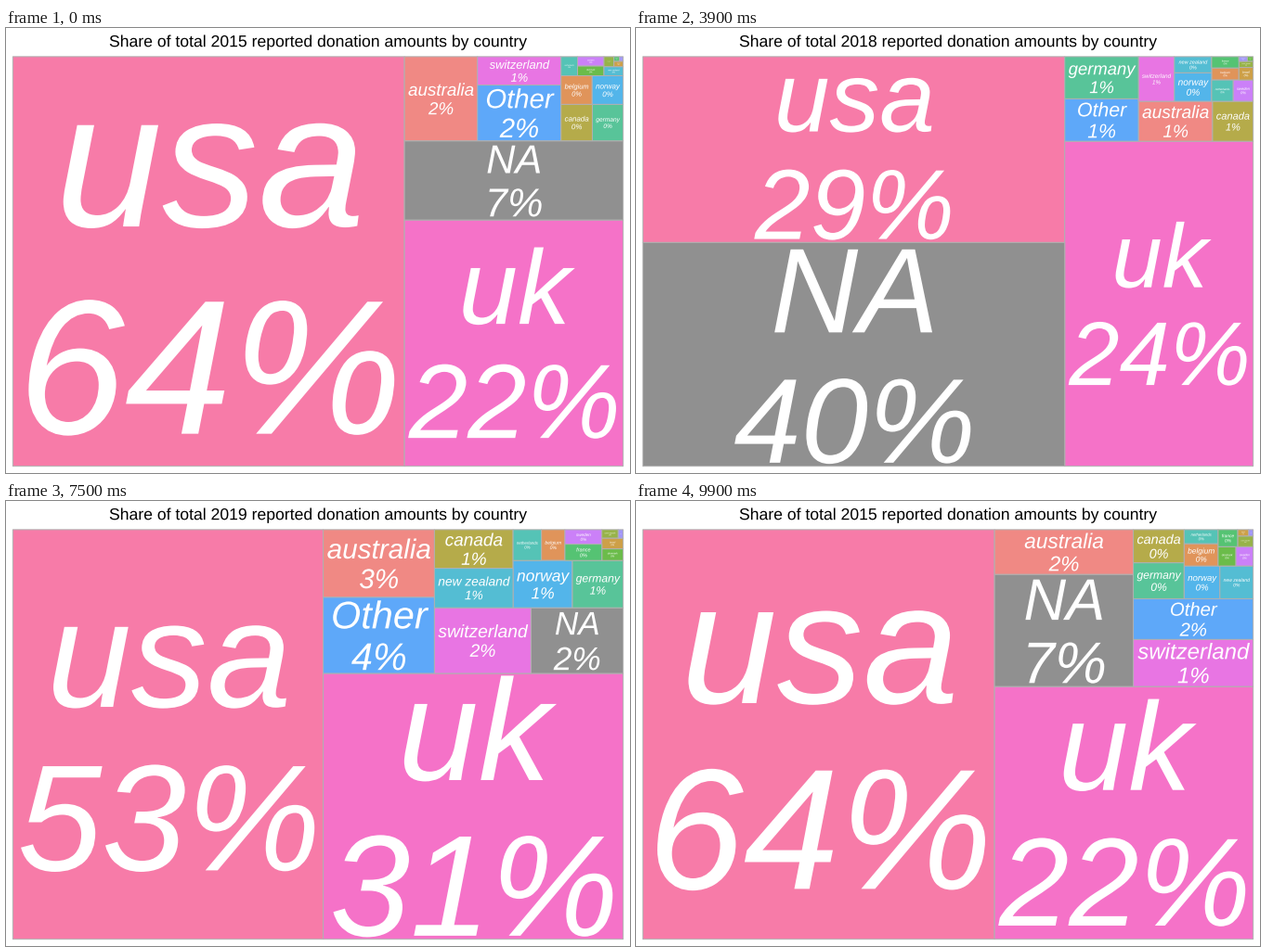
A matplotlib script for the animation above (10 s loop, 672 by 480 pixels).

```python
from functools import lru_cache

import matplotlib.pyplot as plt
from matplotlib.animation import FuncAnimation
from matplotlib.patches import PathPatch, Rectangle
from matplotlib.textpath import TextPath
from matplotlib.transforms import Affine2D

W, H, DPI = 672, 480, 96
LEFT, BOTTOM, PANEL_W, PANEL_H = 7.33, 7.33, 657.33, 441.8
PAD = 3.78            # 1 mm
LINE_GAP = 1.08       # em between baselines
CAP = 0.716           # em
SLANT = 0.008         # em, balances the side bearings of the italic
HOLD, TWEEN = 15, 5   # frames at rest, frames between two years
STEP = HOLD + TWEEN

YEARS = [2015, 2017, 2018, 2019, 2020]
TOTALS = [6.75, 9.8, 18.6, 16.1, 10.7]   # millions

# name: (colour, share in percent for each year)
COUNTRIES = {
    "usa": ("#f77ba8", (64.15, 49.96, 29.41, 52.70, 37.00)),
    "uk": ("#f572c8", (21.54, 28.25, 24.09, 30.73, 40.66)),
    "NA": ("#909090", (6.92, 12.59, 40.40, 2.21, 4.025)),
    "australia": ("#f08984", (2.46, 1.789, 1.121, 3.073, 2.558)),
    "Other": ("#5ea8f9", (1.865, 1.206, 1.257, 3.538, 2.243)),
    "switzerland": ("#e875e3", (0.95, 0.506, 0.656, 2.025, 6.36)),
    "canada": ("#b5ab4a", (0.457, 1.17, 0.594, 1.197, 1.365)),
    "germany": ("#58c499", (0.45, 1.967, 1.165, 0.877, 1.61)),
    "belgium": ("#e0945a", (0.356, 0.185, 0.126, 0.310, 0.145)),
    "norway": ("#53b5ea", (0.355, 1.579, 0.304, 1.159, 0.814)),
    "netherlands": ("#55c3b6", (0.126, 0.164, 0.186, 0.344, 0.397)),
    "denmark": ("#6bbc4a", (0.104, 0.023, 0.010, 0.080, 0.246)),
    "sweden": ("#cb80f8", (0.098, 0.158, 0.171, 0.212, 0.249)),
    "new zealand": ("#54bdd3", (0.070, 0.319, 0.232, 1.195, 1.583)),
    "czech republic": ("#97b348", (0.040, 0.042, 0.034, 0.044, 0.150)),
    "brazil": ("#cda048", (0.020, 0.070, 0.072, 0.095, 0.054)),
    "france": ("#55c373", (0.010, 0.040, 0.132, 0.203, 0.520)),
    "singapore": ("#a296f8", (0.007, 0.007, 0.017, 0.016, 0.026)),
}

# advance widths in em; every other glyph is 0.556
ADVANCE = {}
for chars, width in (("ijl", 0.222), ("tf ", 0.278), ("r", 0.333),
                     ("ckvxyzs", 0.5), ("AS", 0.667), ("Nw", 0.722),
                     ("O", 0.778), ("m", 0.833), ("%", 0.889)):
    ADVANCE.update(dict.fromkeys(chars, width))


def advance(text):
    return sum(ADVANCE.get(c, 0.556) for c in text)


@lru_cache(maxsize=None)
def outline(text, style):
    return TextPath((0, 0), text, size=1,
                    prop={"family": "Liberation Sans", "style": style})


def worst_ratio(areas, side):
    thick = sum(areas) / side
    return max(max(thick * thick / a, a / (thick * thick)) for a in areas)


def squarify(areas):
    """Tile the unit square with descending areas, from the bottom left."""
    x = y = 0.0
    w = h = 1.0
    rects = []
    while areas:
        column = w >= h
        side = h if column else w
        n = 1
        while (n < len(areas) and worst_ratio(areas[:n + 1], side)
               <= worst_ratio(areas[:n], side)):
            n += 1
        row, areas = areas[:n], areas[n:]
        thick = sum(row) / side
        pos = y if column else x
        for a in row:
            length = a / thick
            rects.append((x, pos, thick, length) if column
                         else (pos, y, length, thick))
            pos += length
        if column:
            x, w = x + thick, w - thick
        else:
            y, h = y + thick, h - thick
    return rects


def normalised(values):
    total = sum(values.values())
    return {k: v / total for k, v in values.items()}


shares = [normalised({k: v[i] for k, (_, v) in COUNTRIES.items()})
          for i in range(len(YEARS))]

fig = plt.figure(figsize=(W / DPI, H / DPI), dpi=DPI, facecolor="white")
ax = fig.add_axes([0, 0, 1, 1])
ax.set(xlim=(0, W), ylim=(0, H))
ax.axis("off")


def add_text(color):
    return ax.add_patch(PathPatch(outline("NA", "normal"), fc=color,
                                  lw=0, zorder=3, snap=False))


def place(patch, text, size, cx, baseline, style):
    patch.set_path(outline(text, style))
    move = Affine2D().scale(size).translate(
        cx - advance(text) * size / 2, baseline)
    patch.set_transform(move + ax.transData)


title = add_text("black")
tiles = {}
for name, (color, _) in COUNTRIES.items():
    box = ax.add_patch(Rectangle((0, 0), 1, 1, fc=color, ec="#b0b0b0",
                                 lw=0.75, zorder=1, snap=False))
    tiles[name] = box, add_text("white"), add_text("white")


def draw_tile(name, percent, rect):
    x, y = LEFT + rect[0] * PANEL_W, BOTTOM + rect[1] * PANEL_H
    w, h = rect[2] * PANEL_W, rect[3] * PANEL_H
    box, top, low = tiles[name]
    box.set_bounds(x, y, w, h)

    # grow the two lines until they meet the padding
    pad = min(PAD, 0.3 * min(w, h))
    size = min((w - 2 * pad) / max(advance(name), advance(percent)),
               (h - 2 * pad) / (LINE_GAP + CAP))
    cx = x + w / 2 + SLANT * size
    middle = y + h / 2 - CAP / 2 * size
    place(top, name, size, cx, middle + LINE_GAP / 2 * size, "italic")
    place(low, percent, size, cx, middle - LINE_GAP / 2 * size, "italic")


def update(frame):
    state, step = divmod(frame, STEP)
    after = (state + 1) % len(YEARS)
    t = max(0, step - HOLD + 1) / (TWEEN + 1)
    shown = after if t >= 0.5 else state

    # amounts, not shares, change at a steady rate
    mix = normalised({k: (1 - t) * TOTALS[state] * shares[state][k]
                      + t * TOTALS[after] * shares[after][k]
                      for k in COUNTRIES})
    order = sorted(mix, key=mix.get, reverse=True)
    for name, rect in zip(order, squarify([mix[k] for k in order])):
        draw_tile(name, f"{100 * shares[shown][name]:.0f}%", rect)

    heading = (f"Share of total {YEARS[shown]} reported donation "
               "amounts by country")
    place(title, heading, 17.6, W / 2, H - 20.2, "normal")
    return [title] + [p for group in tiles.values() for p in group]


anim = FuncAnimation(fig, update, frames=STEP * len(YEARS), interval=100,
                     init_func=lambda: update(0), repeat=True,
                     repeat_delay=0, blit=False)
plt.show()
```
